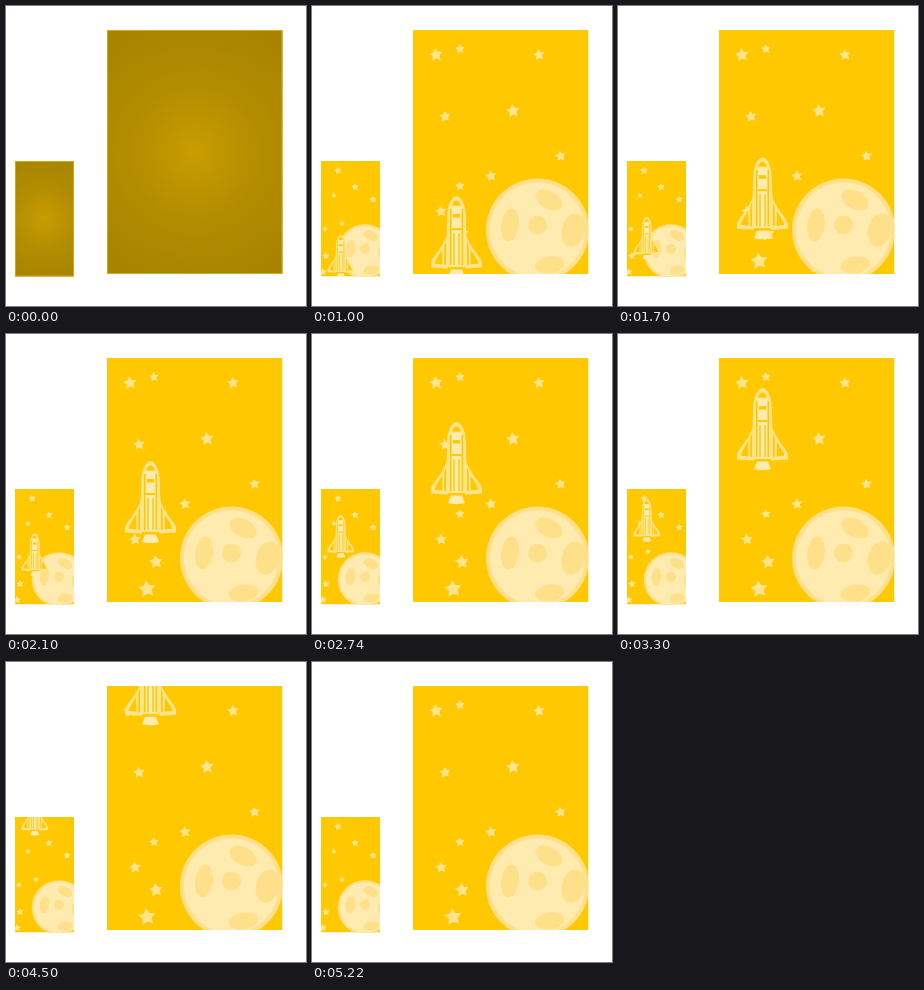
These frames come from a looping animation (300 by 300 pixels, 5.46 s). An HTML page with a canvas:

```html
<!DOCTYPE html>
<html lang="en">
<head>
<meta charset="utf-8">
<title>Rocket poster</title>
<style>
html, body { margin: 0; width: 100%; height: 100%; overflow: hidden; background: #fff; }
canvas { display: block; width: 100vw; height: 100vh; }
</style>
</head>
<body>
<canvas id="stage" width="300" height="300"></canvas>
<script>
const ctx = document.getElementById('stage').getContext('2d');
const LOOP = 5460, INTRO = 1000, FIRST = 1060, STEP = 80;
const YELLOW = '#ffc800', PALE = '#ffe48c', CREAM = '#ffebb0', CRATER = '#ffe08a';

const panels = [
  {
    x: 101, y: 24, w: 175.5, h: 244,
    moon: [225.5, 224, 1],
    rocket: { x: 144.5, top: 190.1, speed: 4.857, scale: 1 },
    stars: [[124, 49, 7], [148, 43, 5], [227, 49, 6], [133, 110.5, 6], [201, 105, 7],
      [248.5, 150, 5.7], [179, 170, 5.7], [148, 180, 5], [129, 205.5, 6], [150, 228, 7.2], [141, 255, 9]]
  },
  {
    x: 9, y: 155, w: 59, h: 115.5,
    moon: [53, 245.5, 0.53],
    rocket: { x: 28.8, top: 229, speed: 2.286, scale: 0.52 },
    stars: [[26, 164.5, 4], [43, 181, 4], [61, 193.5, 3.8], [22, 189.5, 3], [30, 217.5, 3.2],
      [13, 223, 3], [14, 250, 4], [11, 266, 4]]
  }
];

const hull = new Path2D('M0 0C6 1 9 10 9.3 20L9.8 39C12 49 24 61 25.5 66V71.5L10 72.5H-10L-25.5 71.5V66C-24 61-12 49-9.8 39L-9.3 20C-9 10-6 1 0 0Z');
const dome = new Path2D('M-4.8 13C-4 7-2.5 4.5 0 4.5S4 7 4.8 13L4.4 9.5H-4.4Z');
const wing = new Path2D('M10.5 45C12 52 20 61 22 67.5L10.5 69Z');
const flame = new Path2D('M-5.5 73.5H5.5L8.5 81C4 82.5-4 82.5-8.5 81Z');

function fill(color, path) {
  ctx.fillStyle = color;
  path ? ctx.fill(path) : ctx.fill();
}

function box(color, x, y, w, h) {
  ctx.fillStyle = color;
  ctx.fillRect(x, y, w, h);
}

function ellipse(color, x, y, rx, ry, turn = 0) {
  ctx.beginPath();
  ctx.ellipse(x, y, rx, ry, turn, 0, Math.PI * 2);
  fill(color);
}

function star([x, y, r]) {
  ctx.beginPath();
  for (let i = 0; i < 10; i++) {
    const a = i * Math.PI / 5 - Math.PI / 2 - 0.12;
    const d = i % 2 ? r * 0.52 : r;
    ctx.lineTo(x + d * Math.cos(a), y + d * Math.sin(a));
  }
  ctx.closePath();
  fill(PALE);
}

function moon([x, y, scale]) {
  ctx.save();
  ctx.translate(x, y);
  ctx.scale(scale, scale);
  ellipse(CRATER, 0, 0, 51.5, 51.5);
  ellipse(CREAM, 0, 0, 47.5, 47.5);
  ctx.beginPath();
  ctx.arc(0, 0, 47.5, 0, Math.PI * 2);
  ctx.clip();
  ellipse(CRATER, -27.5, -5, 9, 16.5, 0.12);
  ellipse(CRATER, 0, -5, 9.5, 9.5);
  ellipse(CRATER, 11.5, -30, 14.5, 9, 0.5);
  ellipse(CRATER, 36, 0, 11.5, 17, 0.25);
  ellipse(CRATER, 12, 35, 15, 8.5, -0.15);
  ctx.restore();
}

function rocket({ x, top, speed, scale }, step) {
  ctx.save();
  ctx.translate(x, top - speed * step);
  ctx.scale(scale, scale);
  fill(PALE, hull);
  fill(YELLOW, dome);
  for (const side of [1, -1]) {
    ctx.save();
    ctx.scale(side, 1);
    box(YELLOW, 4.8, 13, 1.8, 56);
    fill(YELLOW, wing);
    box(PALE, 12.2, 49, 2, 20);
    ctx.restore();
  }
  box(CREAM, -4.8, 10.5, 9.6, 59);
  box(YELLOW, -3.5, 18, 7, 3.5);
  box(YELLOW, -4.8, 32, 9.6, 2);
  box(YELLOW, -3.2, 37, 1.4, 32);
  box(YELLOW, 1.8, 37, 1.4, 32);
  box(YELLOW, -8.5, 71, 17, 2.5);
  fill(CREAM, flame);
  ctx.restore();
}

function goldCard({ x, y, w, h }) {
  const cx = x + w / 2, cy = y + h / 2;
  const glow = ctx.createRadialGradient(cx, cy, 0, cx, cy, h * 0.6);
  glow.addColorStop(0, '#c89d00');
  glow.addColorStop(0.45, '#b38d00');
  glow.addColorStop(1, '#a58300');
  box(glow, x, y, w, h);
  ctx.strokeStyle = '#d2aa0c';
  ctx.lineWidth = 1;
  ctx.strokeRect(x + 0.5, y + 0.5, w - 1, h - 1);
}

function poster(panel, step) {
  ctx.save();
  ctx.beginPath();
  ctx.rect(panel.x, panel.y, panel.w, panel.h);
  ctx.clip();
  box(YELLOW, panel.x, panel.y, panel.w, panel.h);
  panel.stars.forEach(star);
  moon(panel.moon);
  rocket(panel.rocket, step);
  ctx.restore();
}

function draw(t) {
  box('#fff', 0, 0, 300, 300);
  const step = Math.max(0, Math.floor((t - FIRST) / STEP + 1e-6));
  for (const panel of panels) {
    if (t < INTRO) goldCard(panel);
    else poster(panel, step);
  }
}

const start = performance.now();
function tick() {
  draw((performance.now() - start) % LOOP);
  requestAnimationFrame(tick);
}
tick();
</script>
</body>
</html>
```
